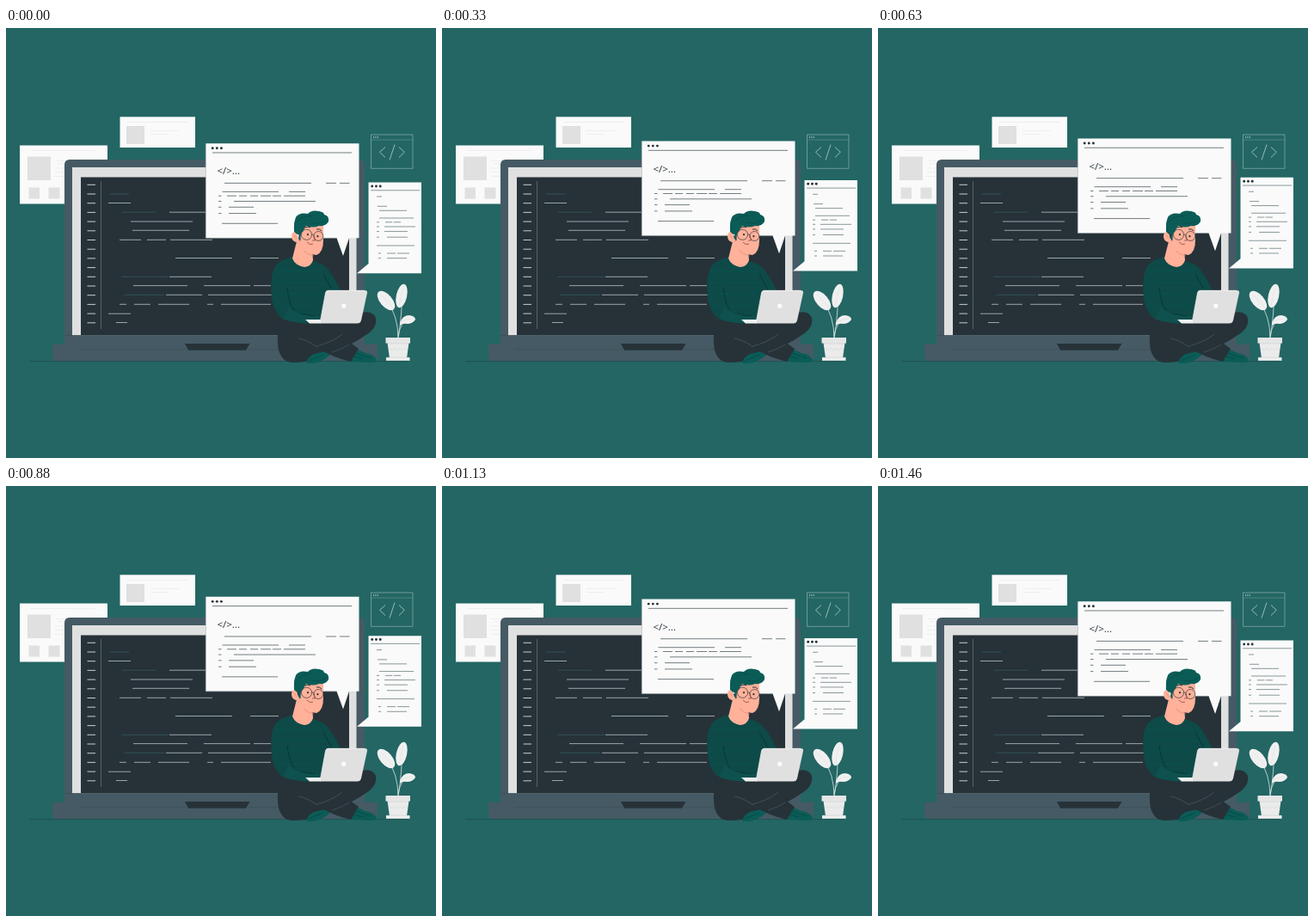
Write an HTML page with a canvas that moves like this. It is 500 px wide and 500 px high and loops after 1.5 s.

```html
<!DOCTYPE html>
<html lang="en">
<head>
<meta charset="utf-8">
<title>Coding at a laptop</title>
<style>
html, body { margin: 0; width: 100%; height: 100%; overflow: hidden; background: #236664; }
canvas { display: block; width: 500px; height: 500px; }
</style>
</head>
<body>
<canvas id="stage" width="500" height="500"></canvas>
<script>
const ctx = document.getElementById('stage').getContext('2d');
const LOOP = 1500, PEAK = 730, LIFT = 6;
const C = {
  bg: '#236664', slate: '#455a64', dark: '#263238', white: '#fafafa', grey: '#e0e0e0',
  sweater: '#0d4a48', hair: '#0b5c57', skin: '#ffb19a', faint: '#e6e6e6'
};

const rect = (x1, y1, x2, y2, color) => {
  ctx.fillStyle = color;
  ctx.fillRect(x1, y1, x2 - x1, y2 - y1);
};
const fill = (d, color) => {
  ctx.fillStyle = color;
  ctx.fill(new Path2D(d));
};
const stroke = (d, color, width = 0.6) => {
  ctx.strokeStyle = color;
  ctx.lineWidth = width;
  ctx.stroke(new Path2D(d));
};
const dot = (x, y, r, color) => {
  ctx.fillStyle = color;
  ctx.beginPath();
  ctx.arc(x, y, r, 0, Math.PI * 2);
  ctx.fill();
};
const leaf = (x, y, rx, ry, angle) => {
  ctx.fillStyle = '#f0f0f0';
  ctx.beginPath();
  ctx.ellipse(x, y, rx, ry, angle, 0, Math.PI * 2);
  ctx.fill();
};
// Each row is "y: from-to from-to ...".
const rows = (text, color, width) => {
  for (const row of text.split(';')) {
    const [y, spans] = row.split(':');
    for (const span of spans.trim().split(' ')) {
      const [from, to] = span.split('-');
      stroke(`M${from} ${y.trim()}H${to}`, color, width);
    }
  }
};

function cards() {
  rect(16, 136.5, 118, 204.5, C.white);
  rect(25, 149.5, 52, 177, C.grey);
  rect(26.5, 185.5, 39, 198.5, C.grey);
  rect(49.5, 185.5, 62.5, 198.5, C.grey);
  rows('142.5: 29-104; 154.5: 57-68; 157.5: 60-68; 163: 57-68; 167.5: 57-68; 172.5: 57-68', C.faint);
  rect(132.5, 103.3, 220, 139, C.white);
  rect(140, 114, 161, 135, C.grey);
  rows('109.5: 141-212; 119.5: 168-201; 123.5: 168-188', C.faint);
}

function laptop() {
  fill('M68 368V159Q68 153 74 153H411Q417 153 417 159V368Z', C.slate);
  rect(77, 162, 407.5, 357.5, C.grey);
  rect(87, 173.5, 399, 357, C.dark);
  fill('M54 367.5H432V382Q432 387.5 426 387.5H60Q54 387.5 54 382Z', C.slate);
  rect(68, 357.5, 417, 368, C.slate);
  fill('M208 367H283.5L279 374.7H212Z', C.dark);
  stroke('M68.5 357.5H417M84 373.8H209M282 373.8H402', '#36474f', 0.5);
  stroke('M27 387.5H468', '#1d4a4b', 0.7);
  stroke('M110.5 178V350', '#87939a', 0.5);
  for (let i = 0; i < 16; i++) stroke(`M94.5 ${182.3 + i * 10.7}h9.5`, '#d8dfe1', 0.9);
  rows('193: 121-143; 214.2: 135-174; 289.3: 134-189; 310.3: 137-184', '#35605f', 0.7);
  rows(`203.5: 119-145; 214.2: 190-232; 225: 145-217; 235.3: 147-213; 246.3: 132-157 164-186 191-240;
    267.5: 197-263 284-317; 289.3: 190-239; 299.6: 148-211 230-284 288-308; 310.3: 186-228 235-310;
    321.3: 132-140 149-168 177-213 234-241 250-308; 332.2: 119-145; 342.5: 128-141`, '#c3cbce', 0.75);
}

function outlineCard() {
  stroke('M424.5 124H473V163.3H424.5Z', '#97b7b4', 0.65);
  stroke('M424.5 130H473', '#76a09d', 0.5);
  for (let i = 0; i < 3; i++) dot(427.5 + i * 2.4, 127, 0.7, '#c5d8d6');
  stroke('M441 138.5L434.5 144.3L441 150.5M452 135.5L446 153.5M457 138.5L463.3 144.3L457 150.5', '#a9c4c1', 0.9);
}

function windowDots(x, y, step) {
  for (let i = 0; i < 3; i++) dot(x + i * step, y, 1.45, C.dark);
}

function floatingWindows(dy) {
  ctx.save();
  ctx.translate(0, dy);

  fill('M232.3 134.2H410.5V244.3H399L392 265L384.5 244.3H232.3Z', C.white);
  stroke('M232.3 134.2V244.3H384.5', '#9aa5a8', 0.5);
  windowDots(240.2, 139.8, 5.1);
  ctx.fillStyle = C.dark;
  ctx.font = '11.5px "Open Sans", sans-serif';
  ctx.fillText('</>...', 245.4, 170.3);
  rows(`145: 240-402; 180.4: 254-355 372-384 388-399.5; 190.4: 251.5-317 329-348;
    195.2: 247-250.5 257-268 271-280 284-293 296-308 310-320 323-348; 201.5: 247-250.5 265-360;
    208.3: 247-250.5 259-288; 215.6: 247-250.5 259-291; 227.3: 251-316`, '#3a484d', 0.7);

  fill('M421.5 179.6H483V285.2H408L421.5 274Z', C.white);
  windowDots(425.7, 184, 4.75);
  rows(`188.8: 424-481; 196: 431-437; 207.3: 432-443; 212.3: 434-466; 221: 434-474;
    225.8: 431-434 441-449.5 451-459; 231: 431-434 440-476; 236.6: 431-434 440-467;
    243.2: 431-434 443-467; 253: 431-475; 262: 433-436 443-453 455-469; 267.7: 433-436 443-466`, '#4b6265', 0.65);
  ctx.restore();
}

function plant() {
  stroke('M443 317Q456 335 456 361M460 311Q461 330 456 361M468 339Q459 341 456 358', '#dce5e4', 0.8);
  leaf(442, 317, 13.5, 7, 0.87);
  leaf(460, 311.5, 14, 6.2, -1.36);
  fill('M458 343Q461 334 469 334Q476 335 476 339Q473 344 466 344Q461 343 458 346Z', '#f0f0f0');
  stroke('M436 310Q446 320 451 327M462 301L457 323M459 342Q466 338 473 338', '#d2d9d8', 0.4);
  fill('M443.5 366H468.5L466 384H446Z', '#ebebeb');
  rect(441.5, 360, 470, 366.5, '#e6e6e6');
  rect(442, 383, 469.5, 386.8, '#f0f0f0');
  stroke('M444 367H468M442 383.2H469', '#bdc6c6', 0.5);
  stroke('M446 372l3 3l3 -3l3 3l3 -3l3 3l3 -3l3 3', '#d0d5d5', 0.6);
}

function legs() {
  fill('M414 331Q426 328 430 337Q432 346 423 354Q399 371 378 377Q355 389 338 389L342 365L390 342Z', C.dark);
  fill('M349 390Q350 383 358 379L371 376L378 379Q369 388 357 390Z', C.hair);
  fill('M407 373L418 378Q430 380 431 387Q430 389 423 389L401 388Z', C.hair);
  fill('M321 336Q345 338 367 346Q389 357 410 373L401 388Q382 384 360 371Q351 386 336 389Q320 390 316.5 372Q314 350 321 336Z', C.dark);
  stroke('M361 370Q378 366 391 356M362 371Q349 362 340 361M379 377Q390 374 399 368', '#526067', 0.6);
  stroke('M352 387L369 380M407 378L424 384M405 382L415 385', '#083e3c', 0.6);
}

function torso() {
  fill('M333 266Q318 270 313 277Q307 287 308.5 307Q309 328 320 337Q335 345 365 342L373 305H389Q380 286 371 277Q363 272 356 271Q346 277 333 266Z', C.sweater);
  stroke('M327 302Q329 322 337 331L364 336M369 286Q374 296 379 304', '#082f30', 0.7);
  rows('283: 314-367; 296: 311-373; 309: 310-365; 323: 314-362', '#0a5b57', 0.55);
  fill('M329 324Q341 336 365 335L362 343Q337 345 322 338Z', '#0e514e');
}

function head() {
  fill('M339 244L333 268Q336 276 347 278Q355 277 357 270L356 257Z', C.skin);
  fill('M341 229Q354 222 369 229L369 247Q369 261 361 264Q350 264 343 253Z', C.skin);
  fill('M338 238Q332 235 332 243Q333 250 341 249Z', C.skin);
  fill('M337 239Q333 230 337 220Q341 214 351 216Q355 211 364 213Q370 214 370 217Q376 218 375 225Q372 231 364 230Q357 233 349 230Q346 236 343 239L342 248Q339 244 341 240Z', C.hair);
  fill('M335 237Q334 221 342 217L350 219L344 234L341 241Z', C.hair);
  stroke('M341 224Q348 216 357 219M355 226Q365 229 372 223', '#08413f', 0.5);
  for (const [x, y, r] of [[349.5, 240.3, 6.1], [363.3, 242, 5.5]]) {
    ctx.strokeStyle = C.dark;
    ctx.lineWidth = 0.65;
    ctx.beginPath();
    ctx.arc(x, y, r, 0, Math.PI * 2);
    ctx.stroke();
  }
  stroke('M342 239L343.5 239.5M355.5 240.5Q357 239 358 241', C.dark, 0.65);
  dot(351, 240.2, 1.1, C.dark);
  dot(362.4, 242.2, 1.1, C.dark);
  stroke('M348 232Q351 230 354 232M361 234Q365 233 367 236', C.dark, 1);
  stroke('M358 241L359.5 247L356 247M350 249Q353 253 357 251', '#7d3830', 0.7);
  stroke('M346 259Q351 264 358 265M335 241L338 245', '#d97e70', 0.6);
}

function smallLaptop() {
  fill('M348 339H367L366 343.5H353Z', '#f0f0f0');
  fill('M375 305H417Q420.5 305 420 308L413 340Q412 343.5 408.5 343.5H365L371.5 308Q372 305 375 305Z', C.grey);
  stroke('M365 343L371.5 308Q372 305.3 375 305.3H417', '#f5f5f5', 0.7);
  dot(392.8, 323.2, 2.7, C.white);
}

function draw(now) {
  const phase = (now % LOOP - PEAK) / LOOP * Math.PI * 2;
  rect(0, 0, 500, 500, C.bg);
  cards();
  laptop();
  outlineCard();
  floatingWindows(-LIFT * (1 + Math.cos(phase)) / 2);
  plant();
  legs();
  torso();
  head();
  smallLaptop();
}

let start;
function frame(now) {
  start ??= now;
  draw(now - start);
  requestAnimationFrame(frame);
}
draw(0);
requestAnimationFrame(frame);
</script>
</body>
</html>
```
